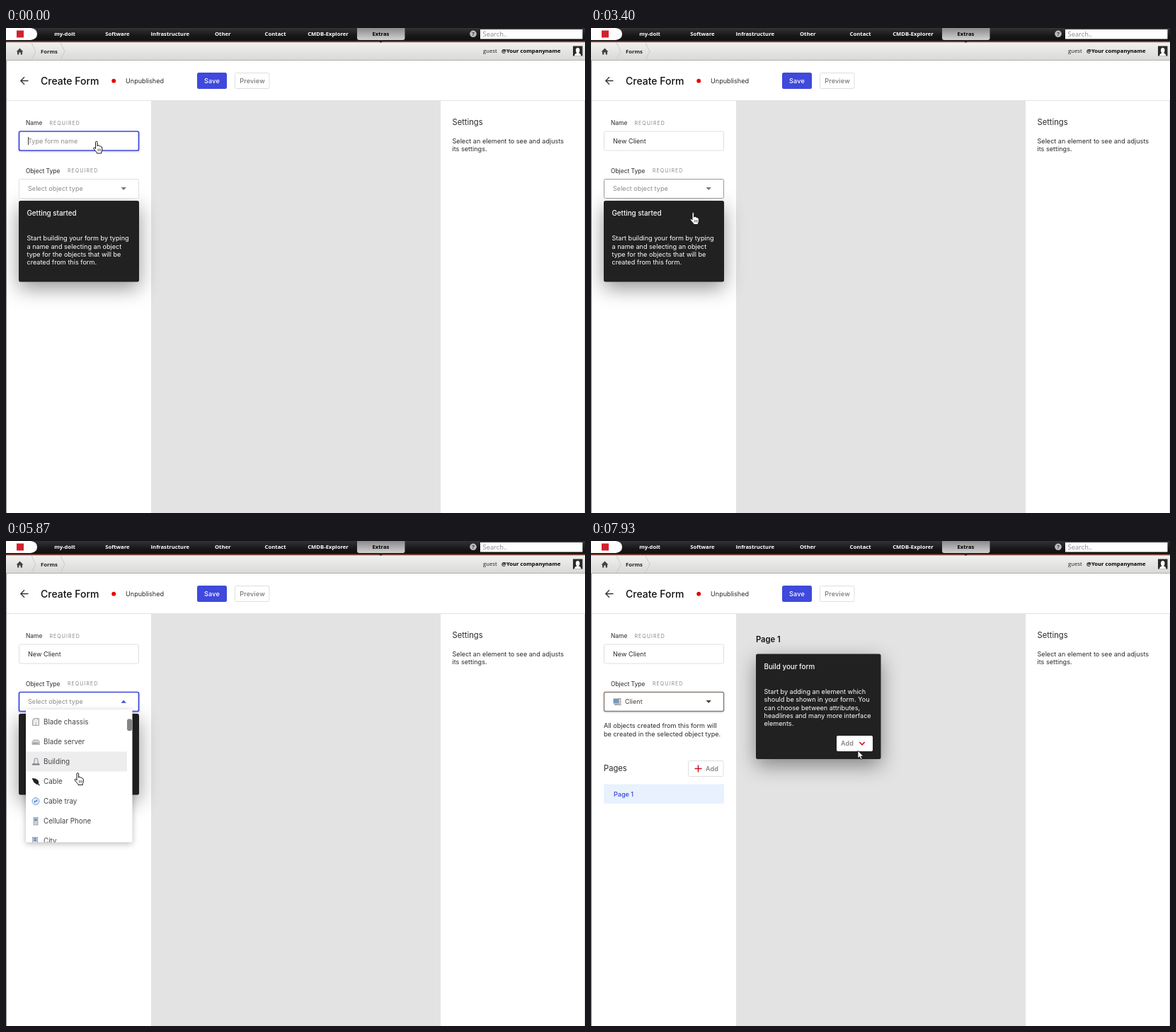
An HTML page that plays this animation: 818x685 px, repeating every 8 s.

```html
<!DOCTYPE html>
<html lang="en">
<head>
<meta charset="utf-8">
<title>Create Form</title>
<style>
html, body { margin: 0; width: 100%; height: 100%; overflow: hidden; background: #fff; }
svg { display: block; width: 818px; height: 685px; font: 9.1px Inter, sans-serif; fill: #2b2b2b; }
text { white-space: pre; }
.nav { font: bold 7.7px "Open Sans", sans-serif; fill: #fff; }
.bar { font: bold 7.7px "Open Sans", sans-serif; fill: #222; }
.mid { text-anchor: middle; }
.label { font-size: 8.4px; font-weight: 500; fill: #444; }
.req { font-size: 7px; letter-spacing: 1.05px; fill: #888; }
.btn { font-weight: 500; letter-spacing: .15px; fill: #777; }
.big { font-size: 11.2px; }
.hint { fill: #8c8c8c; }
.white { fill: #fff; }
.head { font-size: 9.8px; font-weight: 500; fill: #fff; }
.item { font-size: 9.8px; fill: #444; }
.card { fill: #212121; filter: drop-shadow(0 9px 14px rgba(0,0,0,.42)); }
.menu { fill: #fff; filter: drop-shadow(0 2px 4px rgba(0,0,0,.28)); }
.box { fill: #fff; stroke: #dfdfdf; }
.focus { fill: #fff; stroke: #4049d9; stroke-width: 1.7; filter: drop-shadow(0 1px 1px rgba(64,73,217,.3)); }
.hover { fill: #fff; stroke: #999; }
.done { fill: #fff; stroke: #8a7d74; stroke-width: 1.4; filter: drop-shadow(0 1px 1px rgba(0,0,0,.15)); }
</style>
</head>
<body>
<svg viewBox="0 0 818 685">
  <defs>
    <linearGradient id="dark" x2="0" y2="1"><stop stop-color="#333"/><stop offset=".6" stop-color="#161616"/><stop offset="1" stop-color="#111"/></linearGradient>
    <linearGradient id="tab" x2="0" y2="1"><stop stop-color="#7d7d7d"/><stop offset="1" stop-color="#d2d2d2"/></linearGradient>
    <linearGradient id="crumb" x2="0" y2="1"><stop stop-color="#f1f1ef"/><stop offset="1" stop-color="#d9d9d7"/></linearGradient>
    <clipPath id="list"><rect x="28" y="238" width="150.5" height="187.5" rx="2"/></clipPath>
  </defs>

  <rect width="818" height="19" fill="url(#dark)"/>
  <rect y="18.5" width="818" height="2" fill="#8d4a40"/>
  <path d="M0 0H35Q44 1 44 8.500T35 17H0Z" fill="#fff"/>
  <rect x="15" y="3.500" width="10" height="10" fill="#d3212c"/>
  <rect x="496" y="-3" width="67.500" height="20" rx="3" fill="url(#tab)"/>
  <g id="nav" class="nav mid"></g>
  <circle cx="660" cy="8.300" r="4.800" fill="#bbb"/>
  <text class="nav mid" x="660" y="11" style="fill:#333">?</text>
  <rect x="670" y="2" width="144.500" height="13.500" fill="#fff"/>
  <text x="673.500" y="12" style="font:9.4px 'Open Sans',sans-serif" fill="#888">Search..</text>

  <rect y="20.500" width="818" height="24.500" fill="url(#crumb)"/>
  <path d="M525.500 17h8l-4 4z" fill="#222"/>
  <rect y="45" width="818" height="1" fill="#b0b0ae"/>
  <path d="M14.500 33.500 19.500 28.500 24.500 33.500H23V37.500H20.700V34.500H18.300V37.500H16V33.500Z" fill="#444"/>
  <path d="M36 21 42 33 36 45M77 21 83 33 77 45" fill="none" stroke="#cbcbc9"/>
  <text class="bar" x="49" y="36">Forms</text>
  <text class="bar" x="674" y="35.300" style="font-weight:400">guest</text>
  <text class="bar" x="700" y="35.300" style="fill:#000">@Your companyname</text>
  <rect x="801" y="25.500" width="13.500" height="14" fill="#2a2a2a"/>
  <path d="M803 39.500Q803.500 36 806.300 35.500 804.500 32.500 805 30 807.700 25.500 810.500 30 811 32.500 809.200 35.500 812 36 812.500 39.500Z" fill="#fff"/>

  <path d="M31.500 74.500H21M26 69.300 20.800 74.500 26 79.700" fill="none" stroke="#333" stroke-width="1.300"/>
  <text x="49" y="79.500" style="font-size:14px;font-weight:500" fill="#111">Create Form</text>
  <circle cx="152.200" cy="74.700" r="2.900" fill="#e80000"/>
  <text x="169" y="78">Unpublished</text>
  <rect x="270" y="63" width="42" height="23" rx="2.500" fill="#3f49dc"/>
  <text class="btn mid" x="291" y="78" style="fill:#fff">Save</text>
  <rect class="box" x="323.500" y="63.500" width="48.500" height="22" rx="2"/>
  <text class="btn mid" x="348" y="78">Preview</text>

  <path d="M0 102.500H818M817.500 103V685" stroke="#e2e2e2"/>
  <rect x="205" y="103" width="409" height="582" fill="#e3e3e3"/>
  <path d="M.5 46V685" stroke="#8f8f8f"/>
  <text class="big" x="630.500" y="137">Settings</text>
  <text x="630.500" y="163">Select an element to see and adjusts</text>
  <text x="630.500" y="174.200">its settings.</text>
  <text class="label" x="28" y="137">Name</text><text class="req" x="61.500" y="136.700">REQUIRED</text>
  <text class="label" x="28" y="204.500">Object Type</text><text class="req" x="87" y="204.200">REQUIRED</text>
  <g id="live"></g>
</svg>
<script>
const $ = id => document.getElementById(id);
const text = (x, y, s, cls = '', extra = '') => `<text x="${x}" y="${y}" class="${cls}" ${extra}>${s}</text>`;
const rect = (x, y, w, h, attrs) => `<rect x="${x}" y="${y}" width="${w}" height="${h}" ${attrs}/>`;
const path = (d, attrs) => `<path d="${d}" ${attrs}/>`;
const lines = (x, y, list, cls, step = 11.25) => list.map((s, i) => text(x, y + i * step, s, cls)).join('');

$('nav').innerHTML = ['my-doit', 'Software', 'Infrastructure', 'Other', 'Contact', 'CMDB-Explorer', 'Extras']
  .map((s, i) => text(83 + i * 74.4, 10.5, s, '', i == 6 ? 'style="fill:#000"' : '')).join('');

// Icons are drawn in an 11 x 11 cell
const blue = 'fill="#dceafa" stroke="#3f78b5"', gray = 'fill="#d0d3d6" stroke="#888c92" stroke-width=".7"';
const rack = path('M.5 6 2.500 3H9L10.800 6V9.500H.5Z', gray) + path('M1.500 7.500H9', 'stroke="#777"');
const items = [
  ['Air Condition System', rect(1, 1, 10, 10, 'rx="2" fill="#c9a9ad"') + path('M3.500 0V12M6 0V12M8.500 0V12M0 4H12M0 8H12', 'stroke="#85828f" stroke-width=".8"')],
  ['Aircraft', path('M5.500 0Q6.500.5 6.500 4L11 7V8.300L6.500 7V9.500L8 11H3L4.500 9.500V7L0 8.300V7L4.500 4Q4.500.5 5.500 0', 'fill="#111"')],
  ['Amplifier', rect(.5, 2, 10.500, 7.500, 'fill="#2e6db8" stroke="#1f5290"') + rect(2, 3.700, 2, 4, 'fill="#cfe3fa"') + '<circle cx="7.500" cy="5.700" r="2" fill="#5fa4e6" stroke="#fff"/>'],
  ['Appliance', rack + rect(5, 5.500, 5.500, 5, blue)],
  ['Application', rect(.5, 1.500, 10.500, 8.500, blue) + path('M0 3H11', 'stroke="#3f78b5" stroke-width="1.600"')],
  ['Blade chassis', path('M1 3 3 .5H10V10.500H1Z', gray) + path('M3.500 3V10M8 3V10M5.700 1V6', 'stroke="#fff" stroke-width="1.300"')],
  ['Blade server', rack],
  ['Building', path('M2.500 9 4 1H8L9.500 9Z', gray) + path('M6 2V9', 'stroke="#fff"') + rect(.5, 8.500, 10.500, 2, 'fill="#777d85"')],
  ['Cable', path('M0 1 5 1.500 9 4 10 8 7 10 3 7Z', 'fill="#222"') + path('M7 8 11 11', 'stroke="#222" stroke-width="1.500"')],
  ['Cable tray', '<circle cx="5.500" cy="5.500" r="5" fill="#d9e8fa" stroke="#7fa4d3"/>' + path('M4 7.500V5M7 3.500V6M4 6 7 5', 'stroke="#2c68b0"')],
  ['Cellular Phone', rect(2.500, .5, 6, 10.500, gray) + rect(3.500, 2, 4, 3.500, 'fill="#6e9bcb"')],
  ['City', rect(1, .5, 7, 9.500, gray) + path('M2.500 2.500H6.500M2.500 5H6.500', 'stroke="#4b7dba" stroke-width="1.300"') + path('M6 10.500 8 6.500 11 10.500Z', 'fill="#777"')],
  ['Client', rect(.5, 1.500, 7, 6, 'fill="#6d9bd1" stroke="#8c9099"') + rect(7.500, .8, 3, 9.500, gray) + path('M1.500 9.500H7', 'stroke="#888" stroke-width="1.500"')],
  ['Cluster', [0, 2, 4].map((d, i) => rect(.5 + d * .8, .8 + d, 7, 5, i == 2 ? 'fill="#fff" stroke="#3f86c8"' : 'fill="#8fc1ea" stroke="#3f86c8"')).join('')],
  ['Conduit', rack]
];
const icon = (i, x, y) => `<g transform="translate(${x} ${y})">${items[i][1]}</g>`;

const hand = path('M-1.500.9a1.300 1.300 0 0 1 2.600 0V6.200l.3-.9q2.200-.6 2.400.9 2-.4 2.200 1 1.800-.1 1.800 1.400V12q0 1.600-1 2.600V16.500H.4V15.400Q-2 12.800-4.200 9.900q-.6-1.600 1-1.600l1.700 1.600z', 'fill="#fff" stroke="#111" stroke-width=".95"')
  + path('M2 10v3.500M3.800 10v3.500M5.600 10v3.500', 'stroke="#111" stroke-width=".6"');
const arrow = path('M0 0V11L2.500 8.600 4.200 12.500 6.100 11.700 4.500 7.900H7.800Z', 'fill="#fff" stroke="#111" stroke-width=".8"');

// All times are ticks of 1/15 s; each key is [tick, ...values]
const pointer = [[0, 128, 160.5], [31, 128, 160.5], [32, 126, 167], [35, 124, 222], [41, 124, 222], [44, 118, 298],
  [47, 118, 298], [55, 171, 224], [69, 171, 224], [76, 113.5, 316.5], [86, 113.5, 316.5], [88, 101.5, 328],
  [92, 86, 342], [99, 86, 342], [105, 75, 379], [113, 75, 379], [119, 377, 296]];
const scroll = [[0, 0], [77, 0], [82, 140], [93, 140], [97, 210], [119, 210]];
const typing = [7, 9, 10, 12, 15, 17, 19, 21, 23, 25];

function at(keys, k) {
  const i = keys.findIndex(key => key[0] >= k), b = keys[i], a = keys[Math.max(0, i - 1)];
  const p = b[0] > a[0] ? (k - a[0]) / (b[0] - a[0]) : 0;
  return a.slice(1).map((v, j) => v + (b[j + 1] - v) * p);
}

function dropdown(k) {
  const [off] = at(scroll, k), loaded = k >= 68;
  // the row highlight trails the pointer slightly
  const hot = Math.floor((at(pointer, k - 2)[1] - 241.5 + at(scroll, k - 2)[0]) / 28);
  const rows = items.map(([name], i) => {
    const y = 241.5 + i * 28 - off;
    return (i == hot ? rect(28, y, 143, 28, 'fill="#ededed"') : '')
      + (loaded ? icon(i, 36.5, y + 8.5) : '')
      + text(loaded ? (i ? 53 : 54.5) : 42, y + 17.5, name, 'item');
  }).join('');
  return rect(28, 238, 150.5, 187.5, 'rx="2" class="menu"')
    + `<g clip-path="url(#list)">${rows}${rect(171, 238.5 + off * .0905, 7, 17, 'rx="3" fill="#858585"')}</g>`;
}

const intro = rect(18, 244, 170, 114.5, 'rx="2.500" class="card"') + text(29.5, 265.3, 'Getting started', 'head')
  + lines(29.5, 300.3, ['Start building your form by typing', 'a name and selecting an object', 'type for the objects that will be', 'created from this form.'], 'white');

const builder = lines(18, 264, ['All objects created from this form will', 'be created in the selected object type.'], '', 11.8)
  + text(18, 324.5, 'Pages', 'big')
  + rect(137.5, 310.5, 49.5, 22, 'rx="2" class="box"')
  + path('M146.500 321.500H156.500M151.500 316.500V326.500', 'stroke="#d0101c" stroke-width="1.500"')
  + text(162, 325, 'Add', 'btn')
  + rect(18, 343.5, 170, 27.5, 'fill="#e9f1fe"')
  + text(32, 360.8, 'Page 1', '', 'font-weight="500" fill="#3b44d2"')
  + text(233, 142.7, 'Page 1', 'big', 'font-weight="600" fill="#111"')
  + rect(233, 159.5, 176.5, 148.5, 'rx="2.500" class="card"')
  + text(244.5, 181, 'Build your form', 'head')
  + lines(244.5, 216.2, ['Start by adding an element which', 'should be shown in your form. You', 'can choose between attributes,', 'headlines and many more interface', 'elements.'], 'white')
  + rect(347, 275, 51, 22, 'rx="2" fill="#fff"') + text(353, 289.3, 'Add', 'btn')
  + path('M379.300 284 383 287.800 386.700 284', 'fill="none" stroke="#d0101c" stroke-width="1.500"');

function draw(k) {
  const done = k >= 108, open = k >= 67 && !done, active = k >= 64 && !done;
  const over = (k >= 34 && k < 43) || (k >= 51 && k < 64);
  const count = typing.filter(t => k >= t).length;
  const name = count ? text(31, 163, 'New Client'.slice(0, count), '', 'id="name"') : text(31, 163, 'Type form name', 'hint');
  const caret = k == 0 || (k >= 7 && k < 32);
  const border = done ? 'done' : active ? 'focus' : over ? 'hover' : 'box';
  const up = k >= 65 && !done;
  const [x, y] = at(pointer, k);
  const plain = done || (k >= 44 && k < 51);

  $('live').innerHTML = rect(18.5, 146, 169, 27, `rx="2" class="${k < 37 ? 'focus' : 'box'}"`) + name
    + (caret ? rect(31, 154, .9, 11, 'id="caret" fill="#222"') : '')
    + (done ? builder : intro)
    + rect(18.5, 213.5, 169, 27, `rx="2" class="${border}"`)
    + (done ? icon(12, 31.5, 221.5) + text(48, 230.3, 'Client', '', 'fill="#444"') : text(31, 230.3, 'Select object type', 'hint'))
    + (up ? path('M162.500 228.700h7.400l-3.700-4z', 'fill="#4049d9"') : path('M162.500 225h7.400l-3.700 4z', `fill="${done ? '#444' : '#777'}"`))
    + (open ? dropdown(k) : '')
    + `<g transform="translate(${x} ${y})">${plain ? arrow : hand}</g>`;
  if (caret && count) $('caret').setAttribute('x', 31.3 + $('name').getComputedTextLength());
}

let last = -1;
function frame() {
  const k = Math.min(119, Math.floor((performance.now() % 8000 + 4) * .015));
  if (k != last) draw(last = k);
  requestAnimationFrame(frame);
}
frame();
</script>
</body>
</html>
```
